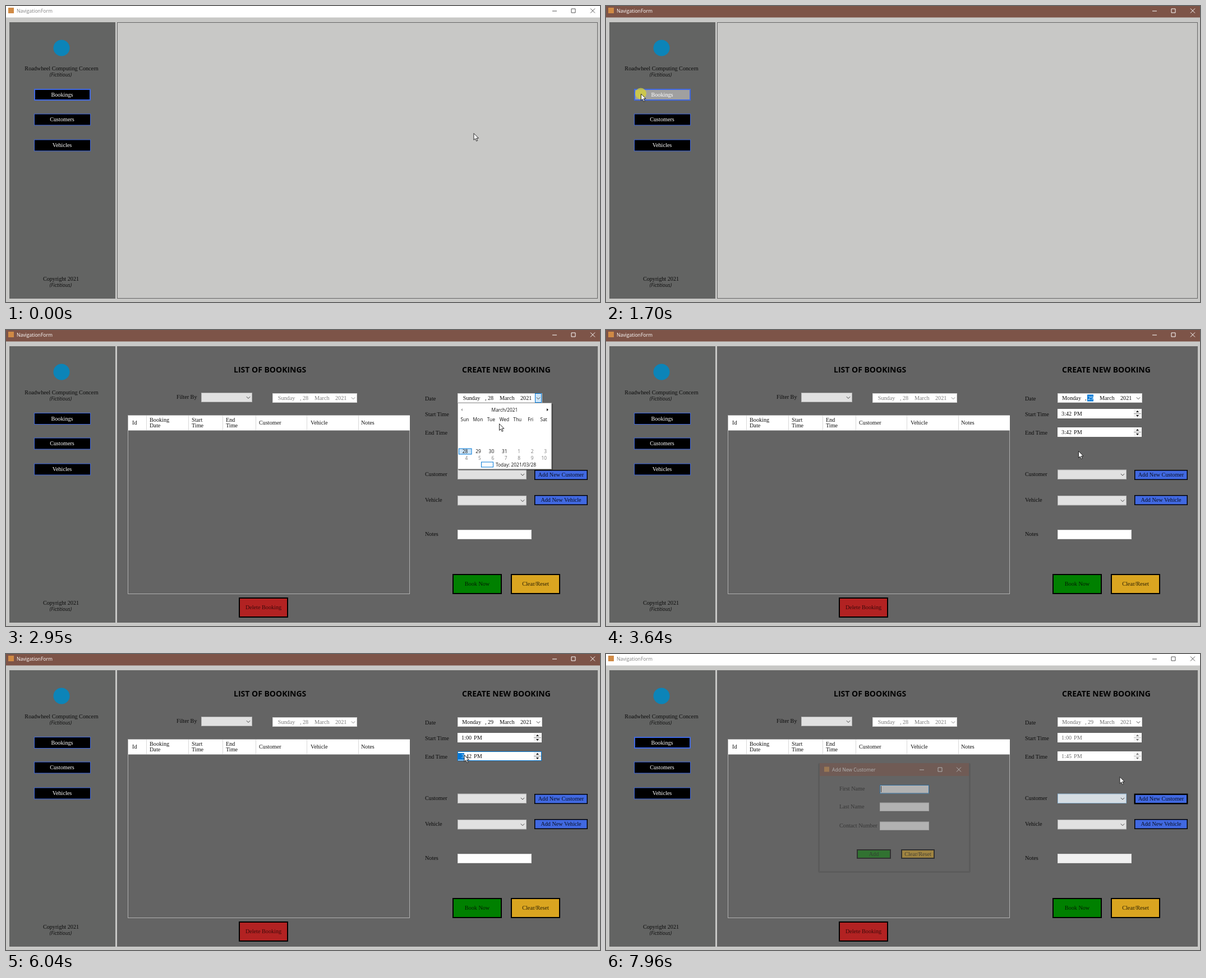
Recreate the animation shown at these times as an HTML page. Size 1059 by 529 pixels, loop 8 s.

```html
<!DOCTYPE html>
<html lang="en">
<head>
<meta charset="utf-8">
<title>NavigationForm</title>
<style>
  html, body { margin: 0; width: 100%; height: 100%; overflow: hidden; background: #c8c8c6; }
  svg { display: block; width: 1059px; height: 529px; }
  text { font: 10.2px "Liberation Serif", "Times New Roman", serif; white-space: pre; }
  .ui { font: 8.6px "Open Sans", sans-serif; }
  .cal { font: 8.4px "Open Sans", sans-serif; }
  .head { font: bold 14px "Open Sans", sans-serif; }
  .note { font: italic 8.8px "Open Sans", sans-serif; }
  .mid { text-anchor: middle; }
  .end { text-anchor: end; }
</style>
</head>
<body>
<svg id="stage" viewBox="0 0 1059 529"></svg>
<script>
const LOOP = 8000, BLUE = '#4169e1', SEL = '#0078d7', PANEL = '#646464';

// ---- markup helpers
const text = (x, y, s, fill = '#0c0c0c', cls = '', id = '') =>
  `<text x="${x}" y="${y}" fill="${fill}" class="${cls}" id="${id}">${s}</text>`;
const box = (x, y, r, b, fill, line = 'none', w = 1, id = '') => {
  const i = line === 'none' ? 0 : w / 2;
  return `<rect id="${id}" x="${x + i}" y="${y + i}" width="${r - x - 2 * i}" height="${b - y - 2 * i}" fill="${fill}" stroke="${line}" stroke-width="${w}"/>`;
};
const path = (d, line, w = 1, fill = 'none', id = '') =>
  `<path id="${id}" d="${d}" stroke="${line}" stroke-width="${w}" fill="${fill}"/>`;
const group = (id, ...parts) => `<g id="${id}">${parts.join('')}</g>`;
const chevron = (x, y, c = '#444') => path(`M${x - 3.2} ${y - 1.6}l3.2 3.2 3.2-3.2`, c, 1);
const button = (x, y, r, b, fill, label, ink, w = 2, id = '') =>
  box(x, y, r, b, fill, '#000', w, id) + text((x + r) / 2, (y + b) / 2 + 3.4, label, ink, 'mid');
const navButton = (y, label, id) =>
  box(50, y, 151, y + 21, '#000', BLUE, 1, id) + text(100, y + 13.7, label, '#fff', 'mid');
const combo = (x, y, r, b, id) =>
  box(x, y, r, b, '#e1e1e1', '#b4b4b4', 1, id) + chevron(r - 7, (y + b) / 2 + .3);
const caption = (x, y, step, id) =>
  path(`M${x} ${y + .5}h8M${x + step} ${y - 3.5}h7v7h-7zM${x + 2 * step} ${y - 4}l8 8m0-8l-8 8`, '#fff', 1, 'none', id);
const spinner = (x, y) =>
  box(x, y, x + 13, y + 15, '#f0f0f0') +
  path(`M${x} ${y + 7.5}h13`, '#999') +
  path(`M${x + 4} ${y + 5}h5l-2.5-3zM${x + 4} ${y + 10}h5l-2.5 3z`, 'none', 0, '#111');
const dateBox = (x, ink, id) => box(x, 113, x + 151, 130, '#fff', '#d0d0d0') +
  box(x + 53, 115.5, x + 64, 127.5, SEL, 'none', 1, id + 'Sel') +
  group(id,
    text(x + 25, 125, 'Sunday', ink, 'mid', id + 'Name'),
    text(x + 49, 125, ',', ink), text(x + 54, 125, '28', ink, '', id + 'Day'),
    text(x + 75, 125, 'March', ink), text(x + 112, 125, '2021', ink)) +
  chevron(x + 144, 122, ink === '#111' ? '#444' : '#888');
const timeBox = (y, id) =>
  box(805, y, 955, y + 17, '#fff', '#fff', 1, id + 'Box') +
  box(806, y + 3, 817, y + 15, SEL, 'none', 1, id + 'HSel') +
  box(820, y + 3, 831, y + 15, SEL, 'none', 1, id + 'MSel') +
  group(id, text(812, y + 12, '3', '#111', '', id + 'H'), text(817.2, y + 12, ':', '#111'),
    text(820, y + 12, '42', '#111', '', id + 'M'), text(834, y + 12, 'PM', '#111'));

// ---- parts of the window
const win = box(0, 0, 1059, 20.5, '#fff', 'none', 1, 'bar') +
  box(4, 3, 14, 13, '#d08a45') +
  text(19, 12.2, 'NavigationForm', '#777', 'ui', 'title') + caption(974, 8.5, 34, 'caps');

const side = box(6, 29, 195, 523, '#636463') +
  '<circle cx="99" cy="75" r="14.5" fill="#0c84b8"/>' +
  text(99, 115, 'Roadwheel Computing Concern', '#0c0c0c', 'mid') +
  text(97.5, 125.5, '(Fictitious)', '#0c0c0c', 'mid note') +
  navButton(148, 'Bookings', 'nav') + navButton(192.5, 'Customers') + navButton(238.5, 'Vehicles') +
  text(98, 491, 'Copyright 2021', '#0c0c0c', 'mid') +
  text(97.5, 501.5, '(Fictitious)', '#0c0c0c', 'mid note');

const columns = [['Id', 225], ['Booking|Date', 256], ['Start|Time', 331], ['End|Time', 392],
  ['Customer', 451], ['Vehicle', 543], ['Notes', 633]];
const list = group('list',
  text(406, 75.5, 'LIST OF BOOKINGS', '#000', 'head'),
  text(304, 123.3, 'Filter By'), combo(348, 112, 439, 129), dateBox(475, '#7c7c7c', 'filter'),
  box(217, 152, 720, 472, PANEL, '#b0b0b0'), box(218, 153, 720, 179.5, '#fff'),
  path([250, 325, 386, 445, 536, 628].map(x => `M${x + .5} 153v26`).join(''), '#d8d8d8'),
  ...columns.map(([s, x]) => {
    const [a, b] = s.split('|');
    return b ? text(x, 164, a, '#111') + text(x, 174.3, b, '#111') : text(x, 169.3, a, '#111');
  }),
  button(415, 478, 503, 514, '#b22222', 'Delete Booking', '#3c0a0a'));

const labels = [['Date', 126], ['Start Time', 154], ['End Time', 187], ['Customer', 261], ['Vehicle', 307], ['Notes', 367.7]];
const entry = group('entry',
  text(813, 75.5, 'CREATE NEW BOOKING', '#000', 'head'),
  ...labels.map(([s, y]) => text(747, y, s)),
  dateBox(805, '#111', 'date'),
  timeBox(141, 'from'), timeBox(174, 'to'),
  combo(805, 249.5, 928, 267, 'who'), combo(805, 296, 928, 313.5),
  button(942, 250, 1037, 268, BLUE, 'Add New Customer', '#0a0f22', 1.5, 'addBtn'),
  button(942, 295, 1037, 313, BLUE, 'Add New Vehicle', '#0a0f22', 1.5),
  box(805, 357, 937, 374, '#fff', '#d8d8d8', 1, 'notes'),
  button(796, 436, 884, 472, '#008000', 'Book Now', '#031c03'),
  button(900, 436, 988, 472, '#daa520', 'Clear/Reset', '#2a1f04'));

const colX = i => 818 + 23.45 * i;
const days = [28, 29, 30, 31, 1, 2, 3, 4, 5, 6, 7, 8, 9, 10];
const calendar = group('calendar',
  box(943, 113, 955, 130, '#cce4f7', SEL), chevron(949, 122),
  '<rect x="807" y="132" width="168" height="119" fill="#000" opacity=".28"/>',
  box(805, 130, 973, 249, '#fff', '#a8a8a8'),
  path('M814 140v5l-3-2.5z', 'none', 0, '#aaa'), path('M964 140v5l3-2.5z', 'none', 0, '#111'),
  text(889, 145.7, 'March/2021', '#111', 'cal mid'),
  ...['Sun', 'Mon', 'Tue', 'Wed', 'Thu', 'Fri', 'Sat'].map((d, i) => text(colX(i), 163, d, '#111', 'cal mid')),
  box(807, 211.5, 830.5, 222.5, '#cce4f7', SEL),
  ...days.map((d, i) => text(colX(i % 7) + 5.3, i < 7 ? 220 : 231.6, d, i < 4 ? '#111' : '#7c7c7c', 'cal end', 'day' + d)),
  box(847, 235.5, 869, 245.5, '#fff', SEL), text(873, 243.8, 'Today: 2021/03/28', '#111', 'cal'));

const field = (y, label, id) => text(416, y + 10, label) + box(488, y, 576, y + 15.5, '#fff', '#ddd', 1, id);
const dialog = group('dialog',
  '<rect x="378" y="195" width="272" height="196" rx="3" fill="#000" opacity=".18"/>',
  box(381, 195, 647, 388, PANEL), box(381, 195, 647, 218, '#7d5448'),
  box(389, 201.5, 398, 210.5, '#d08a45'),
  text(403, 210, 'Add New Customer', '#fff', 'ui'), caption(559, 206.5, 33, ''),
  field(234, 'First Name'), box(488, 234, 576, 249.5, 'none', SEL), path('M490.5 236v11', '#111'),
  field(265.5, 'Last Name'), field(299.5, 'Contact Number'),
  button(447, 349, 508, 366, '#008000', 'Add', '#031c03'),
  button(526, 349, 586, 366, '#daa520', 'Clear/Reset', '#2a1f04'));

const pointer = '<circle id="ring" r="10" fill="#dcd62c" opacity=".72"/>' +
  path('M.5 .6V12.4L3.2 9.9 5.2 14.4 7.2 13.5 5.2 9.2H9z', '#111', .9, '#fff', 'arrow');

const stage = document.getElementById('stage');
stage.innerHTML = win + side + box(198, 29, 1055, 523, 'none', PANEL, 1, 'panel') +
  group('spins', spinner(941, 142), spinner(941, 175)) + list + entry +
  '<use href="#spins" id="spinTop"/>' + calendar + dialog + pointer;

// ---- timeline
const $ = id => document.getElementById(id);
const set = (id, key, v) => $(id).setAttribute(key, v);
const show = (id, on) => set(id, 'display', on ? 'inline' : 'none');
const within = (t, a, b) => t >= a && t < b;

// start, end, steps, x, y
const moves = [
  [30, 240, 6, 753, 134], [290, 340, 2, 760, 130], [620, 620, 1, 759, 130],
  [1000, 1550, 12, 62, 156.5], [1830, 2340, 12, 948, 122.5],
  [2720, 2950, 5, 879, 167], [3000, 3360, 8, 842, 216],
  [3660, 4180, 11, 826, 146], [4230, 4280, 2, 806, 147], [4330, 4330, 1, 811, 148],
  [5300, 5710, 9, 816.5, 180], [7110, 7560, 10, 951, 257], [7760, 7960, 5, 915.5, 219]
];
const clicks = [[1650, 1780], [2570, 2720], [3460, 3610], [4610, 4740], [5890, 6030], [7610, 7740]];

function pointerAt(t) {
  let x = 833.5, y = 227;
  for (const [a, b, n, tx, ty] of moves) {
    if (t < a) break;
    const k = Math.min(n, n > 1 ? Math.floor((t - a) / (b - a) * (n - 1) + 1e-6) + 1 : 1) / n;
    const e = k * k * (3 - 2 * k);
    x += (tx - x) * e;
    y += (ty - y) * e;
  }
  return [x, y];
}

function setTime(id, hour, min, part, edge, ink) {
  $(id + 'H').textContent = hour;
  $(id + 'M').textContent = min;
  show(id + 'HSel', part === 'h');
  show(id + 'MSel', part === 'm');
  set(id + 'H', 'fill', part === 'h' ? '#fff' : ink);
  set(id + 'M', 'fill', part === 'm' ? '#fff' : ink);
  set(id + 'Box', 'stroke', edge);
}

function draw(t) {
  const active = within(t, 1640, 7860), off = t >= 7860, open = t >= 1780;
  set('bar', 'fill', active ? '#7d5448' : '#fff');
  set('title', 'fill', active ? '#fff' : '#808080');
  set('caps', 'stroke', active ? '#fff' : '#555');
  set('panel', 'fill', open ? PANEL : 'none');

  const thick = t < 2570 || off ? 2 : 1;
  const i = thick / 2;
  for (const [k, v] of Object.entries({ x: 50 + i, y: 148 + i, width: 101 - thick, height: 21 - thick, 'stroke-width': thick }))
    set('nav', k, v);
  set('nav', 'fill', within(t, 1550, 1780) ? '#a0a0a0' : '#000');

  show('spins', open);
  show('spinTop', open);
  show('list', t >= 1880);
  show('entry', t >= 1830);
  for (const id of ['spins', 'date', 'from', 'to']) set(id, 'opacity', off ? .6 : 1);

  const picked = t >= 3610, daySel = within(t, 3610, 4610);
  $('dateName').textContent = picked ? 'Monday' : 'Sunday';
  $('dateDay').textContent = picked ? '29' : '28';
  show('filterSel', false);
  show('dateSel', daySel);
  set('dateDay', 'fill', daySel ? '#fff' : '#111');
  show('calendar', within(t, 2670, 3610));
  set('day29', 'fill', t >= 3310 ? SEL : '#111');

  const fromFocus = within(t, 4610, 5890), toFocus = within(t, 5890, 7660);
  setTime('from', t < 5070 ? '3' : '1', t < 5260 ? '42' : '00',
    fromFocus && (t < 5160 ? 'h' : 'm'),
    fromFocus ? SEL : within(t, 4130, 4610) ? '#000' : '#fff', '#111');
  setTime('to', t < 6500 ? '3' : '1', t < 6910 ? '42' : t < 7060 ? '04' : '45',
    toFocus && (t < 6550 ? 'h' : 'm'),
    toFocus ? SEL : within(t, 5600, 5890) ? '#000' : '#fff', '#111');

  set('who', 'fill', off ? '#d6dde3' : '#e1e1e1');
  set('who', 'stroke', off ? '#8db4d2' : '#b4b4b4');
  set('notes', 'fill', off ? '#f0f0f0' : '#fff');
  set('addBtn', 'stroke-width', t >= 7660 ? 2.4 : 1.5);

  show('dialog', t >= 7910);
  set('dialog', 'opacity', t < 7960 ? .2 : .5);

  const [x, y] = pointerAt(t);
  const at = `translate(${x.toFixed(1)} ${y.toFixed(1)})`;
  set('arrow', 'transform', at);
  set('ring', 'transform', at);
  show('arrow', !within(t, 6220, 7060));
  show('ring', clicks.some(([a, b]) => within(t, a, b)));
}

function tick() {
  draw(performance.now() % LOOP);
  requestAnimationFrame(tick);
}
tick();
</script>
</body>
</html>
```
